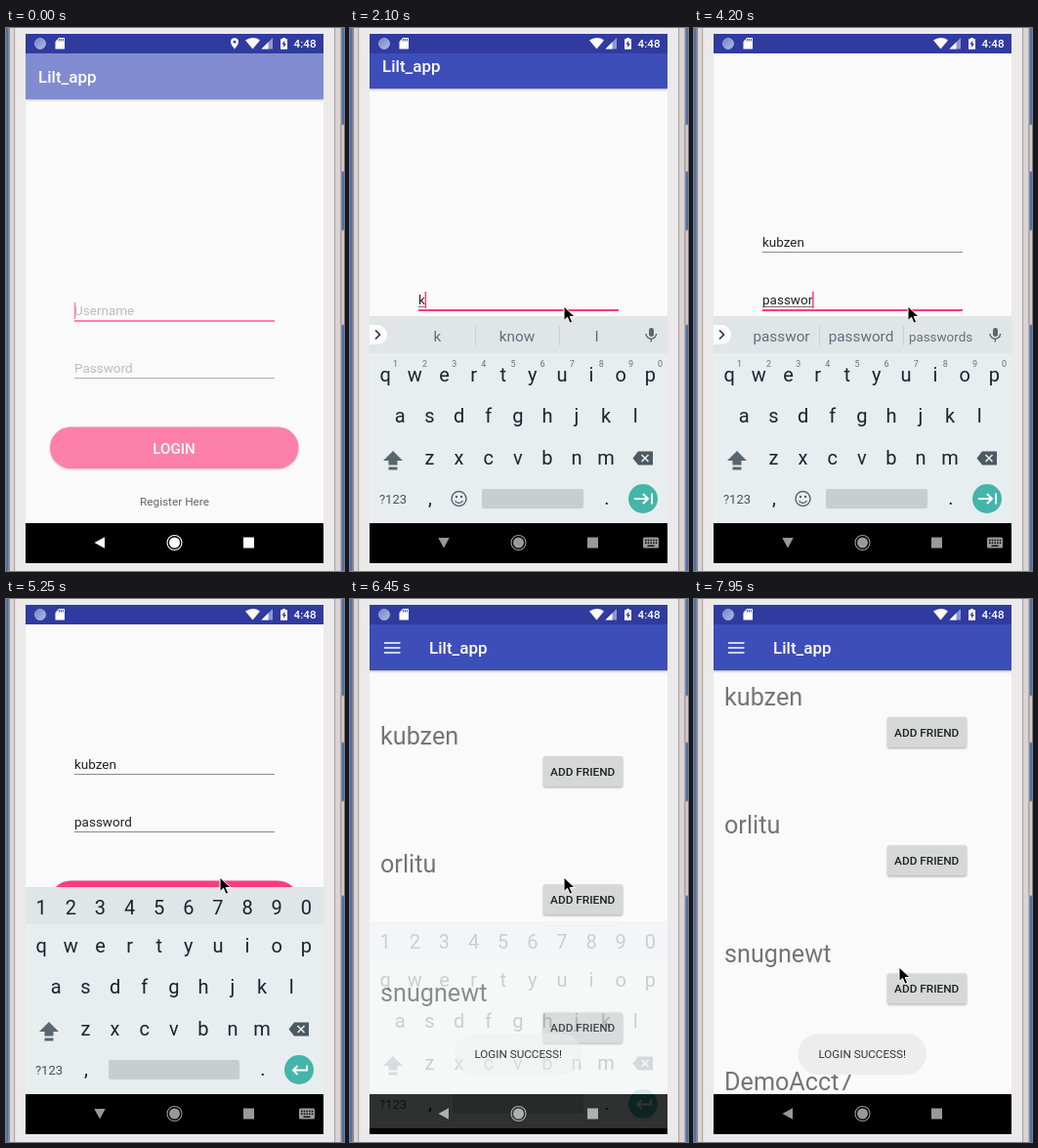
An HTML page for the animation above (8 s loop, 346 by 556 pixels).

```html
<!DOCTYPE html>
<html lang="en">
<head>
<meta charset="utf-8">
<title>Login demo</title>
<style>
  html, body { margin: 0; width: 100%; height: 100%; overflow: hidden; background: #ecebeb; }
  svg { display: block; width: 346px; height: 556px; font-family: Roboto, sans-serif; }
  .mid { text-anchor: middle; }
  .bold { font-weight: 500; }
  .line { fill: none; stroke: currentColor; }
  .raised { filter: drop-shadow(0 1px 1.2px #0005); }
  .title { font-size: 17px; font-weight: 500; fill: #fff; }
  .field { font-size: 13.5px; }
  .name { font-size: 25.2px; fill: #757575; }
  .key { font-size: 20px; fill: #17262d; text-anchor: middle; }
  .hint { font-size: 9px; fill: #66757c; text-anchor: middle; }
  .word { fill: #617078; text-anchor: middle; }
</style>
</head>
<body>
<svg viewBox="0 0 346 556">
  <defs>
    <clipPath id="screen"><rect x="20" y="6" width="305" height="542"/></clipPath>
    <clipPath id="page"><rect x="20" y="26" width="305" height="481"/></clipPath>
    <linearGradient id="ball" x2="1" y2="1">
      <stop stop-color="#6e7fc4"/><stop offset="1" stop-color="#b4bfe4"/>
    </linearGradient>
  </defs>

  <g id="phone"></g>

  <g clip-path="url(#screen)">
    <rect x="20" y="6" width="305" height="542" fill="#fafafa"/>
    <g clip-path="url(#page)">
      <g id="login">
        <rect class="raised" x="20" y="20" width="305" height="53" fill="#3d4eb8"/>
        <text class="title" x="33" y="56">Lilt_app</text>
        <g id="fields"></g>
        <rect class="raised" x="45" y="408.5" width="254.500" height="42.500" rx="21.250" fill="#ff3b7e"/>
        <rect id="press" x="45" y="408.5" width="254.500" height="42.500" rx="21.250" fill="#fff"/>
        <text class="mid bold" x="172" y="435.7" font-size="15.1" fill="#fff">LOGIN</text>
        <text class="mid" x="172.500" y="489" font-size="11.8" fill="#111">Register Here</text>
      </g>
      <rect id="veil" x="20" y="26" width="305" height="481" fill="#fafafa"/>
      <g id="friends">
        <rect x="20" y="26" width="305" height="481" fill="#fafafa"/>
        <g id="list"></g>
        <rect class="raised" x="20" y="20" width="305" height="53" fill="#3d4eb8"/>
        <path d="M35 45h16.500M35 50h16.500M35 55h16.500" stroke="#fff" stroke-width="1.700"/>
        <text class="title" x="81" y="56">Lilt_app</text>
      </g>
    </g>

    <rect x="20" y="507" width="305" height="41"/>

    <g id="keyboard">
      <rect x="20" y="295" width="305" height="212" fill="#e8edf0"/>
      <rect x="20" y="295" width="305" height="38" fill="#e0e5e8"/>
      <g id="letters"></g>
      <g id="words">
        <path d="M20 304h8a10 10 0 0 1 0 20h-8z" fill="#fff"/>
        <path class="line" d="M26 309.500l4.500 4.500-4.500 4.500" color="#333" stroke-width="1.700"/>
        <path class="line" d="M128.500 305v20M214.500 305v20" color="#cbd2d5"/>
        <rect x="306" y="307" width="5" height="9" rx="2.500" fill="#59676e"/>
        <path class="line" d="M303 313a5.300 5.300 0 0 0 10.600 0M308.300 318.500v3" color="#59676e" stroke-width="1.400"/>
      </g>
      <g id="digits"></g>
      <path d="M44 433l10 10h-5.500v4.500h-9v-4.500H34zM39.500 449.500h9v3h-9z" fill="#59676e"/>
      <path d="M289.500 440.500l5.500-7h15v14h-15z" fill="#4c5a61"/>
      <path class="line" d="M298.500 437l7 7m0-7l-7 7" color="#e8edf0" stroke-width="1.600"/>
      <text class="mid" x="44" y="487" font-size="13" fill="#455259">?123</text>
      <text class="key" x="82" y="488">,</text>
      <text class="key" x="263" y="488">.</text>
      <g id="emoji" color="#59676e">
        <circle class="line" cx="111.500" cy="482" r="7.500" stroke-width="1.400"/>
        <path class="line" d="M107.500 484a4.500 4.500 0 0 0 8 0" stroke-width="1.400"/>
        <circle cx="109" cy="480" r="1.200" fill="#59676e"/><circle cx="114" cy="480" r="1.200" fill="#59676e"/>
      </g>
      <rect id="space" y="472" height="20" rx="2" fill="#c8cdd0"/>
      <circle cx="300" cy="482" r="15" fill="#44b5a9"/>
      <path id="action" class="line" color="#fff" stroke-width="2"/>
    </g>

    <rect id="toast" x="106.500" y="445" width="131.500" height="42" rx="21" fill="#ededed"/>
    <text id="message" class="mid" x="172.200" y="470.300" font-size="11.7" fill="#333">LOGIN SUCCESS!</text>

    <g id="nav" fill="currentColor">
      <path id="back" d="M90.500 527l10.500-5.700v11.400z"/>
      <circle cx="172.500" cy="527" r="5.500"/>
      <circle class="line" cx="172.500" cy="527" r="7.500" stroke-width="1.100"/>
      <rect x="243" y="521.500" width="11" height="11"/>
      <g id="switcher">
        <rect x="300" y="521.500" width="16" height="11" rx="1.500"/>
        <path d="M302 524.500h12.500M302 527.200h12.500" stroke="#000" stroke-width="1.500" stroke-dasharray="1.500 1.200"/>
        <path d="M304.500 530.200h7" stroke="#000" stroke-width="1.300"/>
      </g>
    </g>

    <rect x="20" y="6" width="305" height="20" fill="#303b9f"/>
    <circle cx="35" cy="16" r="5.500" fill="url(#ball)" stroke="#a9b3dd" stroke-width=".8"/>
    <path d="M50.500 14l3.500-4h6v11.500h-9.500z" fill="#fff"/>
    <path d="M54.300 11v2.500m2-2.500v2.500m2-2.500v2.500" stroke="#303b9f"/>
    <path id="pin" d="M234 21.500c-2.500-3.200-4-5.200-4-7.300a4 4 0 0 1 8 0c0 2.100-1.500 4.100-4 7.300zm0-8.800a1.500 1.500 0 1 0 .01 0z" fill="#fff"/>
    <path d="M245 12.500q7.500-5 15 0l-7.500 9z" fill="#fff"/>
    <path d="M273 10v11.500h-11.500z" fill="#8f97cf"/>
    <path d="M268.500 14.500v7h-7z" fill="#fff"/>
    <path d="M281 11.200h2v-1.300h3v1.300h2v10.500h-7z" fill="#fff"/>
    <path d="M285.300 12.800l-2.800 4h1.700v3.400l2.600-4.200h-1.500z" fill="#303b9f"/>
    <text class="bold" x="294.500" y="20" font-size="11.7" fill="#fff">4:48</text>
  </g>

  <path id="cursor" d="M0 0v14.500l3.500-3.200 2.500 6 2.700-1.200-2.500-5.600h5z" fill="#000" stroke="#fff" stroke-width="1"/>
</svg>

<script>
const LOOP = 8000;
const $ = id => document.getElementById(id);

function add(parent, tag, attrs, text = '') {
  const node = document.createElementNS('http://www.w3.org/2000/svg', tag);
  set(node, attrs);
  node.textContent = text;
  return parent.appendChild(node);
}
function set(node, attrs) {
  for (const name in attrs) node.setAttribute(name, attrs[name]);
}
function show(id, opacity) { $(id).setAttribute('opacity', +opacity); }

// Phone casing: vertical bands as [x, width, colour], then the side buttons.
[[0, 346, '#ecebeb'], [0, 3, '#4d70b4'], [2, 2, '#8d8688'], [4, 4, '#dcd4d3'],
 [8, 1.5, '#b3abac'], [9.5, 10.5, '#ebe9e9'], [325, 11, '#ebe9ea'], [336, 1.5, '#aba3a5'],
 [337.5, 5, '#dcd4d4'], [342.5, 1.5, '#918a8c'], [344, 2, '#4d70b4']
].forEach(([x, width, fill]) => add($('phone'), 'rect', { x, y: 0, width, height: 556, fill }));
[[99, 48], [207, 97]].forEach(([y, height]) =>
  add($('phone'), 'rect', { x: 343, y, width: 4, height, rx: 1, fill: '#d3cbcb', stroke: '#9b9395' }));

// Keyboard rows
const PITCH = 30.12;
function row(parent, chars, x, y, cls = 'key') {
  [...chars].forEach((c, i) => add(parent, 'text', { class: cls, x: x + i * PITCH, y }, c));
}
row($('letters'), 'qwertyuiop', 36.2, 361.5);
row($('letters'), 'asdfghjkl', 51.3, 404);
row($('letters'), 'zxcvbnm', 81.4, 447);
row($('digits'), '1234567890', 36.2, 322.5);
row($('words'), '1234567890', 46.5, 347, 'hint');
const words = [89.5, 171, 252.5].map(x => add($('words'), 'text', { class: 'word', x, y: 320.5 }));

// Friend list
['kubzen', 'orlitu', 'snugnewt', 'DemoAcct7'].forEach((name, i) => {
  const y = 131.3 * i;
  add($('list'), 'text', { class: 'name', x: 31, y: y + 149 }, name);
  add($('list'), 'rect', { class: 'raised', x: 198, y: y + 161, width: 81, height: 31, rx: 2, fill: '#d6d7d7' });
  add($('list'), 'text', { class: 'mid bold', x: 238.2, y: y + 180.7, 'font-size': 11.8, fill: '#222' }, 'ADD FRIEND');
});

// Text fields
function makeField(hint, y) {
  const box = $('fields');
  const text = add(box, 'text', { class: 'field', x: 70, y });
  const rule = add(box, 'rect', { x: 70, y: y + 5, width: 205 });
  const compose = add(box, 'rect', { x: 70, y: y + 2, height: 0.8, fill: '#555' });
  const caret = add(box, 'rect', { y: y - 13, width: 1.5, height: 17, fill: '#ff3b7e' });
  return (value, focused, caretOn) => {
    text.textContent = value || hint;
    text.setAttribute('fill', value ? '#222' : '#999');
    const width = value ? text.getComputedTextLength() : 0;
    set(rule, focused ? { height: 2, fill: '#ff3b7e' } : { height: 1, fill: '#8b8b8b' });
    set(compose, { width: focused ? width : 0 });
    set(caret, { x: 69.8 + width, opacity: +(focused && caretOn) });
  };
}
const userField = makeField('Username', 294);
const passField = makeField('Password', 353);

// Each track lists [start in ms, value].
const DEFAULT_WORDS = ['The', 'I', 'I\u2019m'];
const tracks = {
  veil: [[0, .36], [150, .16], [300, 0]],
  navColor: [[0, '#fff'], [150, '#eee'], [300, '#ccc'], [450, '#999'], [6450, '#b0b0b0'], [6600, '#999']],
  pan: [[0, 0], [1350, 6], [1500, 11], [3450, 45], [3600, 70], [5250, 120], [5400, 155]],
  keyShift: [[0, 60], [1350, 27], [1500, 0], [6300, 14], [6450, 35]],
  keyAlpha: [[0, 0], [1350, .6], [1500, 1], [6300, .7], [6450, .2], [6600, 0]],
  press: [[0, 0], [5700, .1], [5850, .2], [6000, .1], [6150, 0]],
  friends: [[0, 0], [6300, .55], [6450, 1]],
  toast: [[0, 0], [6450, .45], [6600, 1]],
  message: [[0, 0], [6450, 1]],
  scroll: [[0, 0], [7950, -40]],
  user: [[0, ''], [1950, 'k'], [2700, 'ku'], [2850, 'kub'], [3000, 'kubz'], [3150, 'kubze'], [3300, 'kubzen']],
  pass: [[0, ''], [3900, 'pas'], [4050, 'passw'], [4200, 'passwor'], [4350, 'password']],
  words: [[0, DEFAULT_WORDS], [2100, ['k', 'know', 'I']], [2700, ['ku', 'kudos', 'just']],
    [2850, ['kub', 'cub', 'hub']], [3000, ['kubz', 'cubs', 'hubs']], [3150, ['kubze', 'cubes', 'tubes']],
    [3300, ['kubzen', 'cubes', 'frozen']], [3450, DEFAULT_WORDS], [3900, ['pas', 'pass', 'past']],
    [4050, ['passw', 'password', 'passwords']], [4200, ['passwor', 'password', 'passwords']],
    [4350, ['passwords', 'password', 'Password']]],
  cursor: [[0, null], [600, [296, 440]], [750, [270, 392]], [900, [238, 326]], [1050, [219, 285]],
    [6750, [252, 238]], [6900, [331, 173]], [7050, [246, 214]], [7200, [128, 290]],
    [7350, [72, 345]], [7500, [152, 371]], [7650, [210, 377]]]
};

function sample(t) {
  const state = {};
  for (const name in tracks) {
    for (const [start, value] of tracks[name]) if (t >= start) state[name] = value;
  }
  return state;
}

function render(t) {
  const s = sample(t);
  const typing = t >= 1200 && t < 6300;
  const numeric = t >= 5250;

  set($('login'), { transform: `translate(0 ${-s.pan})` });
  userField(s.user, t < 3450, true);
  passField(s.pass, t >= 3450 && !numeric, t < 4800);
  for (const id of ['press', 'veil', 'friends', 'toast', 'message']) show(id, s[id]);
  set($('list'), { transform: `translate(0 ${s.scroll})` });

  set($('keyboard'), { transform: `translate(0 ${s.keyShift})`, opacity: s.keyAlpha });
  show('words', !numeric);
  show('emoji', !numeric);
  show('digits', numeric);
  set($('space'), numeric ? { x: 105, width: 134 } : { x: 135, width: 104 });
  set($('action'), { d: numeric ? 'M308 477.500v5H293.500m5-4.500l-4.500 4.500 4.500 4.500'
                                : 'M291 482h14m-5-5l5 5-5 5M309 476.500v11' });
  words.forEach((node, i) => {
    node.textContent = s.words[i];
    node.setAttribute('font-size', s.words[i].length > 8 ? 13.4 : 15.3);
  });

  set($('nav'), { color: s.navColor });
  set($('back'), { transform: typing ? 'rotate(-90 96 527)' : '' });
  show('switcher', typing);
  show('pin', t < 900);
  show('cursor', s.cursor !== null);
  if (s.cursor) set($('cursor'), { transform: `translate(${s.cursor})` });
}

const begin = performance.now();
function tick() {
  render((performance.now() - begin) % LOOP);
  requestAnimationFrame(tick);
}
tick();
</script>
</body>
</html>
```
